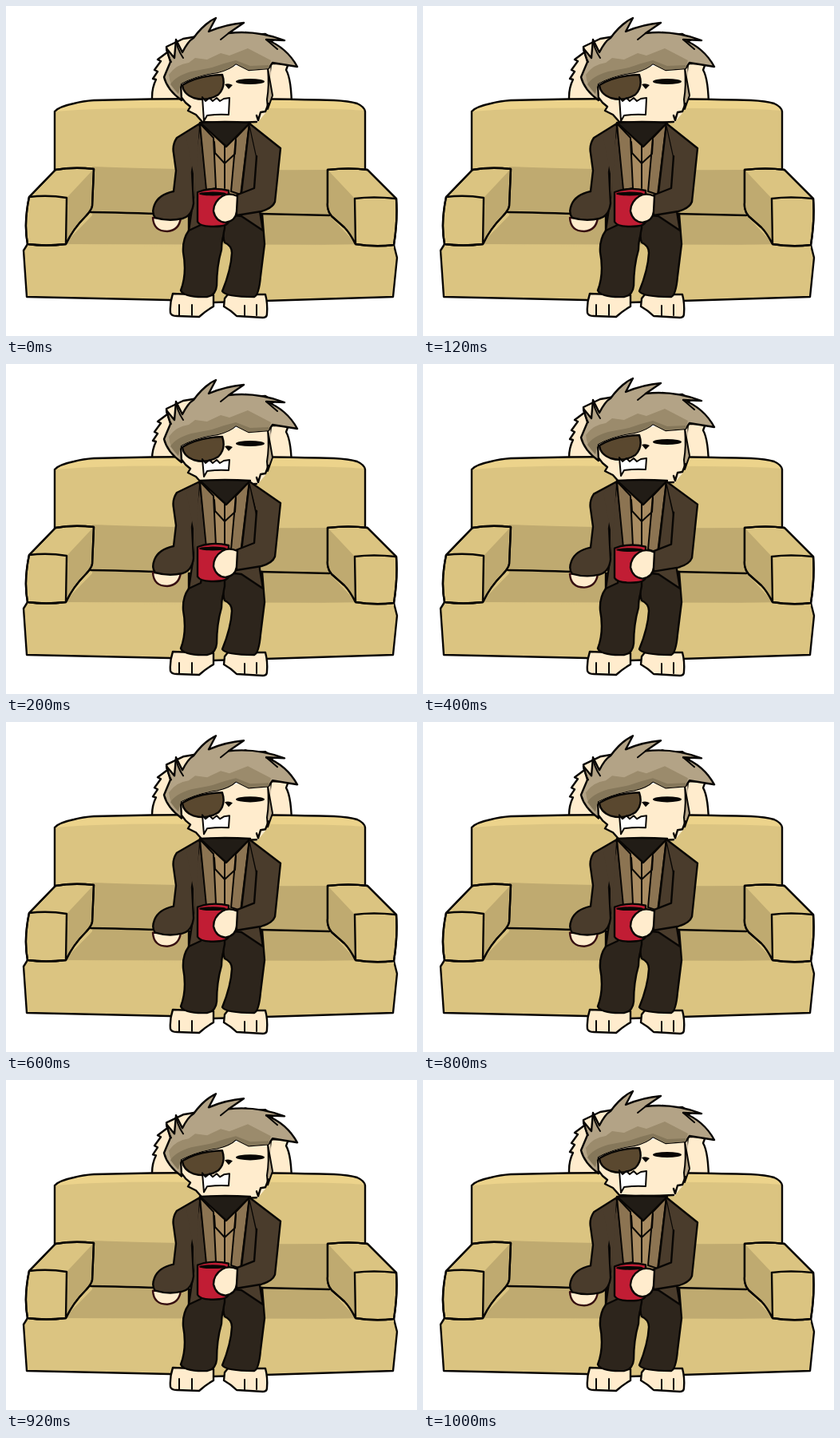
Recreate the animation shown at these times as an HTML page. Size 515 px wide and 413 px high, loop 1.2 s.

```html
<!DOCTYPE html>
<html lang="en">
<head>
<meta charset="utf-8">
<title>Napping on the sofa</title>
<style>
html, body { margin: 0; width: 100%; height: 100%; overflow: hidden; background: #fff; }
svg { display: block; width: 100%; height: 100%; }
path, ellipse { stroke-linejoin: round; stroke-linecap: round; }
</style>
</head>
<body>
<svg id="stage" viewBox="0 0 515 413"></svg>
<script>
const INK = '#080604', TAN = '#dbc481', SHADE = '#bfaa70', SKIN = '#ffeccd';
const COAT = '#4a3c2c', LEGS = '#2d251c', HAIR = '#b3a386', LAPEL = '#8c7452';

const shape = (d, fill, ink = INK, w = 2.4) =>
  `<path d="${d}" fill="${fill}" stroke="${ink}" stroke-width="${w}"/>`;
const flat = (d, fill) => `<path d="${d}" fill="${fill}"/>`;
const line = (d, w = 2.4) => shape(d, 'none', INK, w);
const shift = (y, body) => `<g transform="translate(0 ${y})">${body}</g>`;

const ears =
  shape('M183 130V114Q183 102 188 92L184 91L190 82L186 80L194 69L190 67L202 58L201 51L222 41L240 38V130Z', SKIN) +
  shape('M290 37L300 33L310 36L325 35L336 42L310 60Z', SKIN) +
  shape('M332 72L354 72L351 80Q358 92 358 130H325Z', SKIN);

const back = 'M61 206V132Q66 126 85 122Q96 119 110 118Q180 116 254 116Q340 116 411 118Q430 119 440 122Q449 126 450 132V206';
const leftArm = 'M29 239L62 205Q85 201 110 204L108 250Q107 256 99 264Q84 279 75 298Q50 301 27 298Q22 272 29 239';
const rightArm = 'M403 205Q430 202 453 205L489 241Q491 268 486 299Q462 302 438 298Q431 284 424 277L408 263Q402 256 403 246Z';

const sofa =
  flat(back + 'L440 300H74Z', TAN) +
  flat('M62 132Q68 125 90 121Q180 117 260 117Q340 117 420 119Q445 123 449 131Q400 127 250 128Q130 126 62 132Z', '#ecd38b') +
  flat('M108 201Q250 206 405 205V262L441 300Q250 302 72 299L108 262Z', SHADE) +
  line(back) +
  line('M106 258Q170 259 216 261M318 260L405 262') +
  shape('M27 298L22 306L26 364L205 368L259 371L325 369L485 364L490 315L486 299', TAN) +
  flat('M27 297Q250 304 486 297V303H27Z', TAN) +
  shape(leftArm, TAN) +
  flat('M77 239L108 206L107 250Q106 256 98 263Q84 277 76 294Z', SHADE) +
  line(leftArm + 'Q52 236 76 240L75 298') +
  shape(rightArm, TAN) +
  flat('M404 206L437 241V295Q431 283 424 276L409 262Q403 256 404 246Z', SHADE) +
  line(rightArm + 'M438 298L437 241Q460 238 488 241');

const feet =
  shape('M209 360Q205 372 206 384Q207 388 214 388L242 389Q251 381 260 376V362Z', SKIN) +
  shape('M278 361L274 366L273 376Q282 381 289 388L322 390Q327 390 327 385Q328 372 325 361Z', SKIN) +
  line('M217 374V387M233 374V387M299 375V388M314 374V387', 2);

const legs =
  shape('M229 262V281Q221 292 222 308Q227 335 219 356Q223 365 252 364Q263 362 264 350Q264 326 270 305Q270 289 276 279V262Z', LEGS) +
  shape('M274 260V278Q271 290 274 296Q283 300 283 309Q282 330 271 357Q275 364 311 364Q317 362 319 338L324 298L321 260Z', LEGS);

const torso =
  flat('M244 147H306L298 260H244Z', '#a98c62') +
  shape('M243 147L235 200V240L229 281L244 274L252 230Z', COAT) +
  shape('M243 147L251 230L263 228L260 165Z', LAPEL, INK, 2) +
  shape('M305 147L288 165L282 232L294 236Z', LAPEL, INK, 2) +
  line('M261 170L262 184L274 197L287 185L288 168M274 172V228', 2) +
  shape('M243 146Q274 144 306 146L276 176Z', '#211c16');

const tail = shape('M305 147L295 234L286 262L295 263L322 281L318 257L314 188Z', COAT);

const fringe = 'L329 78L304 80L288 72Q281 79 265 83Q240 86 219 97';
const hair =
  shape('M220 118Q202 105 198 89L206 70L201 53L211 65L213 42L221 58Q228 44 235 40Q248 22 263 15L254 32Q275 23 298 21L279 34Q314 30 349 43L326 42Q352 52 365 76L334 71' + fringe + 'Z', HAIR) +
  flat('M204 86Q213 73 229 71L237 65L252 67L269 59L280 62L303 53L332 68' + fringe + 'L216 110Q205 101 204 86Z', '#9b8b6c') +
  flat('M206 98Q212 88 232 82L258 77L273 72L288 68L306 75L329 74' + fringe + 'L216 110Z', '#85775a') +
  line('M201 53Q203 63 207 70M213 42Q214 53 222 65M279 34L269 42M326 42L340 54', 2);

function head(h) {
  const b = 114 + h;
  return flat('M205 86L210 108L220 119L229 124L229 131L238 136L246 146H315L325 134L333 112L331 70Z', SKIN) +
    line('M206 104L220 118L218 112L225 121L231 126L228 131L238 136L246 145Q280 147 314 145') +
    shape('M328 78L334 112L328 129L327 117Q330 100 328 78Z', HAIR, INK, 2) +
    line('M329 122L325 132L319 133L316 143L314 137') +
    shape('M221 99Q240 87 271 86Q276 101 266 111Q252 120 235 115Q222 110 221 99Z', '#5a482f') +
    hair +
    `<ellipse cx="306" cy="94.5" rx="18" ry="3.6" fill="${INK}"/>` +
    flat('M274 98Q279 96 284 99L279 104Z', INK) +
    shape(`M246 114L250 119L255 115L259 119L264 115L268 119L273 116L280 115L279 ${b - 1}Q265 ${b - 2} 252 ${b}L248 ${b + 7}Z`, '#fff', INK, 2);
}

function arms(a) {
  const y = v => v + a;
  return shape(`M184 ${y(265)}Q185 ${y(282)} 202 ${y(282)}Q217 ${y(281)} 219 ${y(265)}Z`, SKIN, '#350d10') +
    shape(`M243 147L214 ${y(165)}Q208 ${y(174)} 210 ${y(184)}L213 ${y(206)}L210 ${y(232)}Q191 ${y(236)} 186 ${y(249)}Q182 ${y(259)} 187 ${y(265)}Q204 ${y(270)} 221 ${y(266)}Q233 ${y(263)} 235 ${y(247)}L233 ${y(208)}Z`, COAT) +
    flat(`M242 150L226 ${y(164)}L235 ${y(210)}V${y(240)}L239 200Z`, COAT) +
    shape(`M305 147L344 ${y(178)}L337 ${y(245)}Q334 ${y(253)} 320 ${y(257)}L289 ${y(262)}L288 ${y(237)}L311 ${y(228)}L314 ${y(188)}`, COAT) +
    shift(a,
      shape('M240 233Q258 226 279 231V270Q277 276 260 276Q243 276 240 270Z', '#c11d34') +
      `<ellipse cx="259" cy="235" rx="17" ry="2.4" fill="${INK}"/>` +
      shape('M290 238Q279 233 271 238Q260 245 260 257Q263 270 275 271Q288 269 289 257Z', SKIN));
}

// [head drop, arm lift, mouth height]
const poses = [[0, 0, 23], [5, -4, 15], [3, -2.4, 16], [2.3, -1.3, 17], [2.3, -1.3, 17], [-1, .3, 21]];
const stage = document.getElementById('stage');
const start = performance.now();
let shown = -1;

function draw(now) {
  const i = Math.floor(Math.max(0, now - start) / 200) % poses.length;
  if (i !== shown) {
    shown = i;
    const [drop, lift, mouth] = poses[i];
    stage.innerHTML = shift(drop, ears) + sofa + shift(drop, head(mouth)) +
      feet + legs + torso + tail + arms(lift);
  }
  requestAnimationFrame(draw);
}
draw(start);
</script>
</body>
</html>
```
